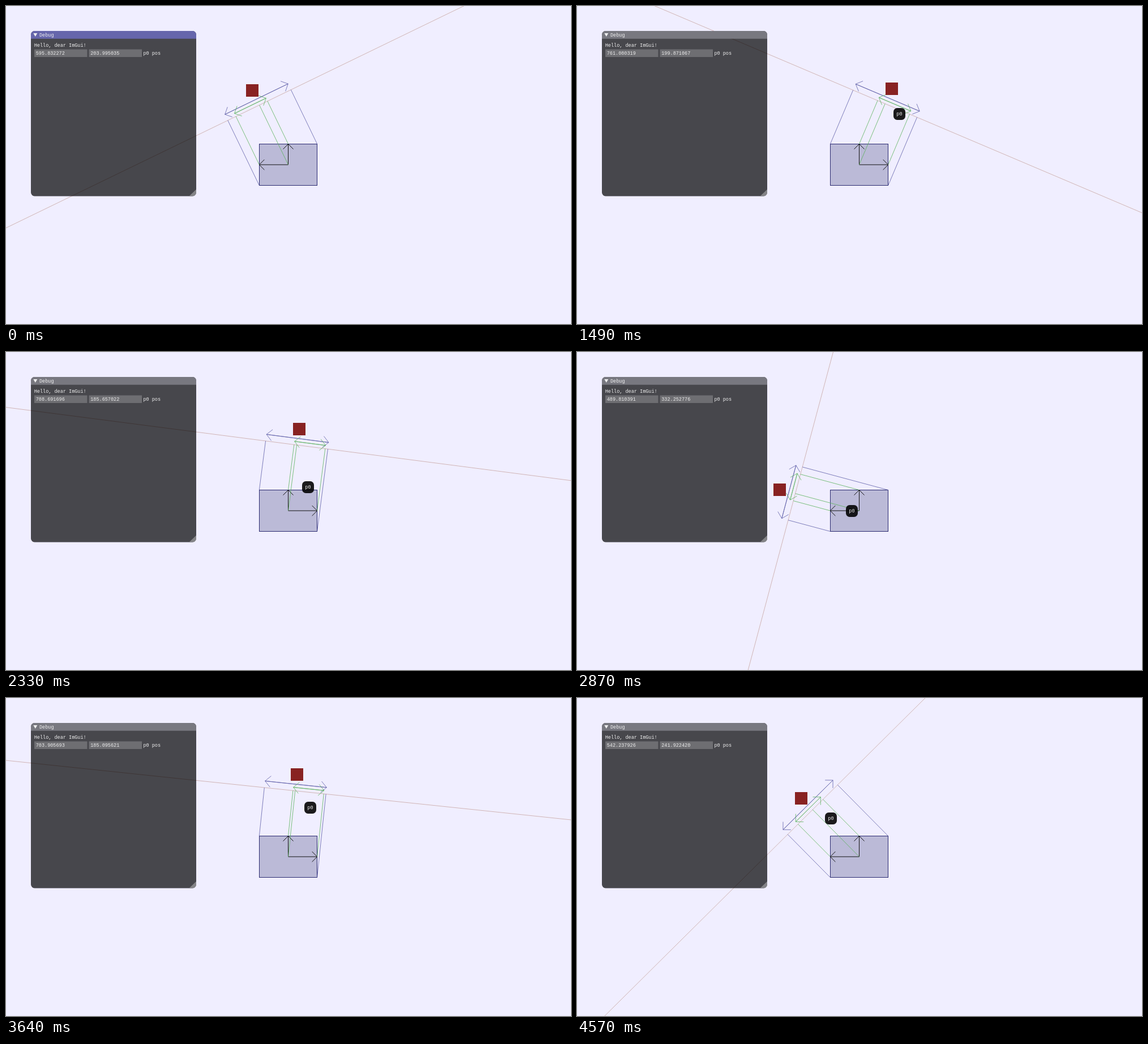
Recreate the animation shown at these times as an HTML page with a canvas. Size 998 by 561 pixels, loop 4610 ms.

```html
<!DOCTYPE html>
<html lang="en">
<head>
<meta charset="utf-8">
<title>Projection debug view</title>
<style>
  html, body { margin: 0; width: 100%; height: 100%; overflow: hidden; background: #f0eeff; }
  canvas { display: block; }
</style>
</head>
<body>
<canvas id="stage" width="998" height="561"></canvas>
<script>
const ctx = document.getElementById('stage').getContext('2d');
const LOOP = 4610, GRAB = 640, DRAG = 870;
const SCALE = 998 / 1366;            // world units to pixels
const CENTER = { x: 683, y: 384 };   // box centre in world units
const ORBIT = 200, AXIS_DISTANCE = 160, HALF_W = 70, HALF_H = 50;
const BLUE = '#6060a8', GREEN = '#5cb35c', AXIS = '#c8a6a2';

const headingOf = (x, y) => Math.atan2(CENTER.y - y, CENTER.x - x);
const deg = a => a * Math.PI / 180;
const REST = headingOf(595.832275, 203.995041);

// Mouse path around the box: time, redraws until next key, heading, radius
const path = [
  [870, 4, deg(67.6), 203],
  [1070, 15, headingOf(637.302856, 189.290543), 201],
  [1860, 3, headingOf(864.919189, 300.901123), 89],
  [2020, 11, deg(165), 82],
  [2590, 4, deg(22), 66],
  [2870, 4, headingOf(489.810394, 332.252777), 58],
  [3150, 3, deg(21), 76],
  [3310, 6, headingOf(545.250122, 239.000122), 110],
  [3640, 1, deg(96), 135],
  [3760, 5, deg(95), 134],
  [4040, 10, headingOf(543.252075, 240.924759), 120],
  [4570, 1, headingOf(542.237915, 241.922409), 152]
];

function slope(i, col) {
  const a = path[i - 1], b = path[i], c = path[i + 1];
  if (!a || !c || (b[col] - a[col]) * (c[col] - b[col]) <= 0) return 0;
  return (c[col] - a[col]) / (c[0] - a[0]);
}

function sample(i, f, col) {
  const a = path[i], b = path[i + 1], span = b[0] - a[0];
  const f2 = f * f, f3 = f2 * f;
  return (2 * f3 - 3 * f2 + 1) * a[col] + (3 * f2 - 2 * f3) * b[col]
    + span * ((f3 - 2 * f2 + f) * slope(i, col) + (f3 - f2) * slope(i + 1, col));
}

function mouseAt(t) {
  if (t < DRAG) return { heading: deg(66.9), radius: 203 };
  let i = path.length - 1;
  while (path[i][0] > t) i--;
  if (i === path.length - 1) return { heading: path[i][2], radius: path[i][3] };
  const [start, steps] = path[i];
  const f = Math.floor((t - start) / (path[i + 1][0] - start) * steps + 1e-6) / steps;
  return { heading: sample(i, f, 2), radius: sample(i, f, 3) };
}

// Points below are in world units relative to the box centre.
const outward = h => ({ x: -Math.cos(h), y: -Math.sin(h) });
const add = (p, v, k) => ({ x: p.x + v.x * k, y: p.y + v.y * k });
const px = p => [498.5 + p.x * SCALE, 280 + p.y * SCALE];

function line(a, b, color, width = 0.8) {
  ctx.strokeStyle = color;
  ctx.lineWidth = width;
  ctx.beginPath();
  ctx.moveTo(...px(a));
  ctx.lineTo(...px(b));
  ctx.stroke();
}

function arrow(from, to, color, head, width) {
  const back = Math.atan2(from.y - to.y, from.x - to.x);
  line(from, to, color, width);
  for (const turn of [-Math.PI / 4, Math.PI / 4]) {
    const wing = { x: Math.cos(back + turn), y: Math.sin(back + turn) };
    line(to, add(to, wing, head), color, width);
  }
}

function rounded(x, y, w, h, r, color) {
  ctx.fillStyle = color;
  ctx.beginPath();
  ctx.roundRect(x, y, w, h, r);
  ctx.fill();
}

function triangle(points, color) {
  ctx.fillStyle = color;
  ctx.beginPath();
  points.forEach(p => ctx.lineTo(...p));
  ctx.fill();
}

function text(str, x, y) {
  ctx.font = '8.52px "Liberation Mono", monospace';
  ctx.fillStyle = '#eeeeee';
  ctx.fillText(str, x, y);
}

function drawScene(u) {
  const origin = { x: 0, y: 0 };
  const sx = u.x < 0 ? -1 : 1, sy = u.y < 0 ? -1 : 1;
  const along = { x: -u.y, y: u.x };
  const project = q => add(q, u, AXIS_DISTANCE - q.x * u.x - q.y * u.y);

  const foot = add(origin, u, AXIS_DISTANCE);
  line(add(foot, along, -1500), add(foot, along, 1500), AXIS);

  ctx.fillStyle = '#bbbad7';
  ctx.fillRect(447.5, 243.5, 102, 73);
  ctx.strokeStyle = '#2b2b70';
  ctx.lineWidth = 1;
  ctx.strokeRect(447.5, 243.5, 102, 73);

  const side = { x: sx * HALF_W, y: 0 }, upright = { x: 0, y: sy * HALF_H };
  const corners = [{ x: -sx * HALF_W, y: sy * HALF_H }, { x: sx * HALF_W, y: -sy * HALF_H }];
  arrow(origin, side, '#111', 17.5, 1);
  arrow(origin, upright, '#111', 17.5, 1);

  const span = (a, b, color, gap) => {
    const [p, q] = [a, b].map(c => add(project(c), u, gap));
    arrow(p, q, color, 19, 0.8);
    arrow(q, p, color, 19, 0.8);
  };
  corners.forEach(c => line(c, project(c), BLUE));
  [origin, side, upright].forEach(c => line(c, project(c), GREEN));
  span(...corners, BLUE, 16);
  span(side, upright, GREEN, 8);
}

function drawPanel(pos, focused) {
  rounded(44, 44, 292, 291.5, 6.5, 'rgba(0,0,0,.7)');
  rounded(44, 44, 292, 13.7, [6.5, 6.5, 0, 0], focused ? '#6666ac' : '#787880');
  triangle([[48.3, 48], [55.3, 48], [51.8, 54]], '#f0f0f0');
  ctx.save();
  ctx.beginPath();
  ctx.roundRect(44, 44, 292, 291.5, 6.5);
  ctx.clip();
  triangle([[323.5, 335.5], [336, 323.5], [336, 335.5]], '#848487');
  ctx.restore();
  text('Debug', 59, 54);
  text('Hello, dear ImGui!', 49.7, 72);
  [pos.x, pos.y].forEach((value, i) => {
    const x = 50 + i * 96.5;
    ctx.fillStyle = '#6e6e72';
    ctx.fillRect(x, 76.5, 93.5, 13.5);
    text(value.toFixed(6), x + 2.7, 86.3);
  });
  text('p0 pos', 242.4, 86.3);
}

function drawTooltip(mouse) {
  const u = outward(mouse.heading);
  const x = Math.round(499 + u.x * mouse.radius * SCALE + 27.8 - 10.5);
  const y = Math.round(280.5 + u.y * mouse.radius * SCALE + 10.7 - 10.5);
  rounded(x, y, 21, 21, 6.5, 'rgba(0,0,0,.89)');
  text('p0', x + 5.3, y + 13.3);
}

function render(t) {
  const mouse = mouseAt(t);
  const u = outward(t < DRAG ? REST : mouse.heading);
  const pos = add(CENTER, u, ORBIT);

  ctx.fillStyle = '#f0eeff';
  ctx.fillRect(0, 0, 998, 561);
  drawScene(u);
  ctx.fillStyle = '#882222';
  ctx.fillRect(Math.round(pos.x * SCALE - 11), Math.round(pos.y * SCALE - 11), 22, 22);
  drawPanel(pos, t < GRAB);
  if (t >= GRAB) drawTooltip(mouse);
}

const began = performance.now();
function tick() {
  render((performance.now() - began) % LOOP);
  requestAnimationFrame(tick);
}
tick();
</script>
</body>
</html>
```
